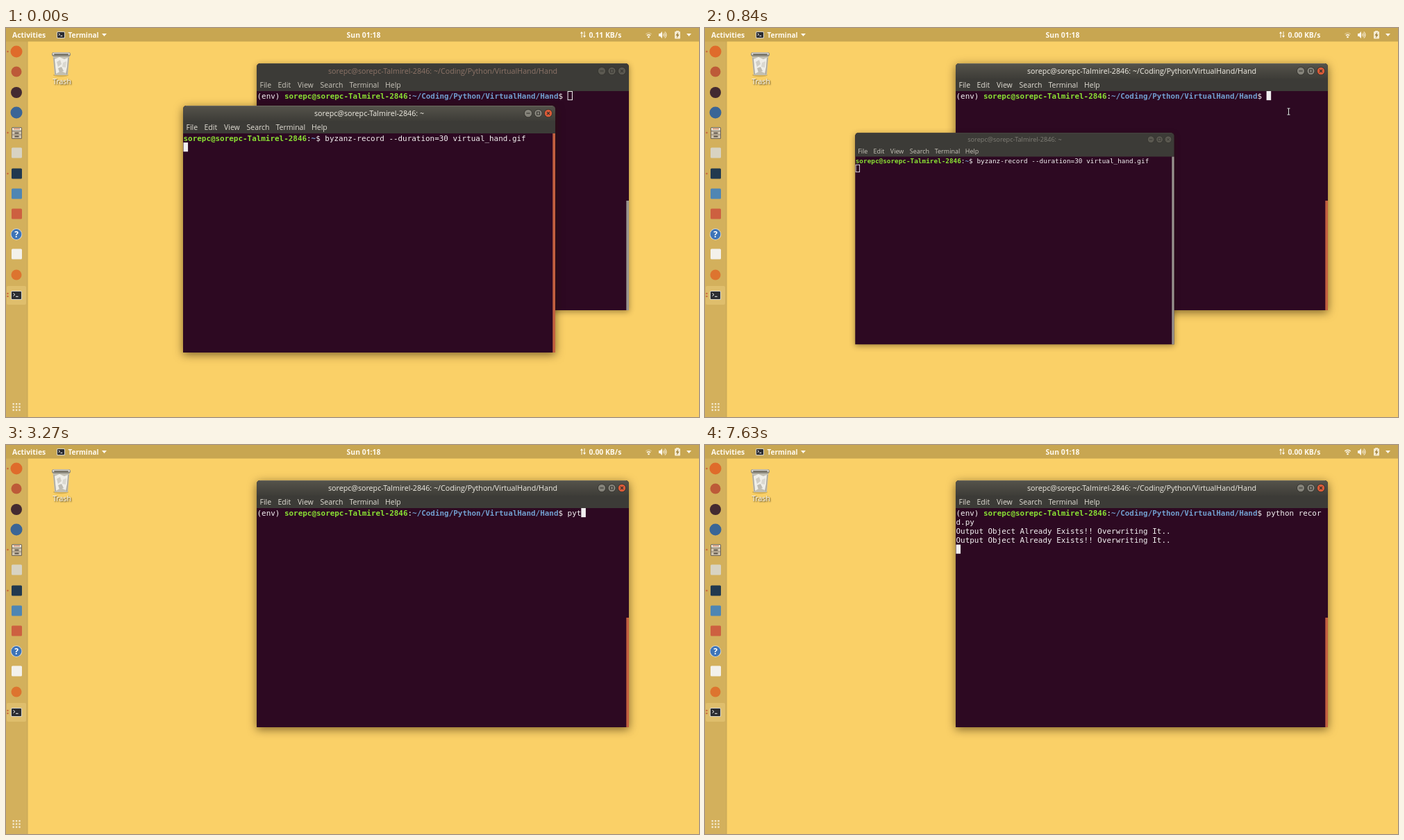
Recreate the animation shown at these times as an HTML page with a canvas. Size 998 by 561 pixels, loop 8000 ms.

```html
<!DOCTYPE html>
<html lang="en">
<head>
<meta charset="utf-8">
<title>Desktop</title>
<style>
html, body { margin: 0; width: 100%; height: 100%; overflow: hidden; background: #fad067; }
canvas { display: block; width: 998px; height: 561px; }
</style>
</head>
<body>
<canvas id="stage" width="998" height="561"></canvas>
<script>
const ctx = document.getElementById('stage').getContext('2d');
const LOOP = 8000;
const UI = '"Open Sans", "Noto Sans", sans-serif';
const MONO = '"DejaVu Sans Mono", "Liberation Mono", monospace';
const CW = 6.575, CH = 13.15, COLS = 80;
const WIN_W = 536, WIN_H = 356;
const USER = 'sorepc@sorepc-Talmirel-2846';
const FOLDER = '~/Coding/Python/VirtualHand/Hand';
const GREEN = '#8ae234', BLUE = '#729fcf', WHITE = '#f3f1f2';
const MENU = [['File', 4.5], ['Edit', 30.5], ['View', 59], ['Search', 91.5], ['Terminal', 133.5], ['Help', 185]];

const SPEED = [[0, '0.11'], [590, '0.00'], [1430, '0.27'], [2470, '0.00'], [3430, '0.12'], [4410, '1.12'], [5510, '0.00']];
const TYPED = [[0, 0], [2520, 1], [2750, 2], [3270, 3], [3370, 4], [3480, 5], [3540, 6], [3920, 7],
  [4280, 8], [4330, 9], [5360, 10], [5430, 11], [5580, 17]];
const BLINK_OFF = [[1240, 1830], [2420, 2520], [4920, 5360], [6130, 6730], [7330, 7510]];
const MOUSE = [[0, null], [740, [773, 125.5]], [790, [816, 121]], [840, [840.5, 120.5]], [890, [842, 124]], [940, [842, 126]], [2570, null]];
const MIN_BUTTON = [[0, '#85837a'], [340, '#a9a79e'], [490, '#bab8b0'], [540, '#cac8c1'], [640, '#dddcd7']];

const at = (keys, t) => keys.reduce((v, [k, next]) => t >= k ? next : v, keys[0][1]);

function rect(x, y, w, h, color) {
  ctx.fillStyle = color;
  ctx.fillRect(x, y, w, h);
}

function rounded(x, y, w, h, r, color) {
  ctx.fillStyle = color;
  ctx.beginPath();
  ctx.roundRect(x, y, w, h, r);
  ctx.fill();
}

function disc(x, y, r, color) {
  ctx.fillStyle = color;
  ctx.beginPath();
  ctx.arc(x, y, r, 0, Math.PI * 2);
  ctx.fill();
}

function poly(points, color) {
  ctx.fillStyle = color;
  ctx.beginPath();
  points.forEach(([x, y]) => ctx.lineTo(x, y));
  ctx.closePath();
  ctx.fill();
}

function line(points, color, width = 1) {
  ctx.strokeStyle = color;
  ctx.lineWidth = width;
  ctx.beginPath();
  points.forEach(([x, y]) => ctx.lineTo(x, y));
  ctx.stroke();
}

function arc(x, y, r, from, to, color, width) {
  ctx.strokeStyle = color;
  ctx.lineWidth = width;
  ctx.beginPath();
  ctx.arc(x, y, r, from, to);
  ctx.stroke();
}

function label(text, x, y, color, font, align = 'left') {
  ctx.font = font;
  ctx.fillStyle = color;
  ctx.textAlign = align;
  ctx.fillText(text, x, y);
}

function vertical(y, h, ...colors) {
  const g = ctx.createLinearGradient(0, y, 0, y + h);
  colors.forEach((c, i) => g.addColorStop(i / (colors.length - 1), c));
  return g;
}

// --- desktop ---

function terminalIcon(x, y, w, h) {
  rounded(x, y, w, h, 1.5, '#d5d2c6');
  rounded(x + 1, y + 1, w - 2, h - 2, 1, '#2b2c31');
  const u = h / 11;
  line([[x + 3 * u, y + 3 * u], [x + 5 * u, y + 4.7 * u], [x + 3 * u, y + 6.4 * u]], '#fff', 1);
  line([[x + 6 * u, y + 7 * u], [x + 9 * u, y + 7 * u]], '#fff', 1);
}

function filesIcon() {
  rounded(8, 143, 15, 17, 1.5, '#6e6353');
  rect(9, 144, 13, 4, '#e8e1d2');
  rect(9, 149, 13, 10, '#cfc4af');
  rect(9, 153.5, 13, 1, '#8d806b');
  rect(11, 145, 9, 1, '#c2613c');
  rect(12.5, 150.5, 6, 2, '#5a5146');
  rect(12.5, 155.5, 6, 2, '#5a5146');
}

function dock() {
  rect(0, 19, 31, 542, '#d3b05c');
  rect(30.5, 19, 1, 542, '#c6a556');
  rounded(1, 372, 28, 27, 2, 'rgba(255,226,150,.28)');

  const circles = [[34, 8.5, '#df6b2b'], [63, 7.5, '#bd5a38'], [93, 8, '#432a31'], [122, 8.5, '#3a6596'], [356, 7.5, '#dd742f']];
  const squares = [[180, '#d8d3c2'], [210, '#21394f'], [239, '#4f86b3'], [268, '#cd6040'], [326, '#f3f1eb']];
  circles.forEach(([y, r, c]) => disc(15, y, r, c));
  squares.forEach(([y, c]) => rounded(8, y - 7.5, 15, 15, 1.5, c));

  filesIcon();
  disc(15, 297.5, 8.2, '#e4e2dc');
  disc(15, 297.5, 7.4, '#3d74b8');
  label('?', 15, 302, '#fff', `bold 12px ${UI}`, 'center');
  terminalIcon(7, 379, 16, 13);

  [34, 151, 210, 383, 387].forEach(y => disc(2.5, y, 1.2, '#c8643a'));
  for (let i = 0; i < 9; i++) rect(9.5 + i % 3 * 4.4, 541 + Math.floor(i / 3) * 4.4, 2.4, 2.4, '#f3e8cc');
}

function trash() {
  ctx.fillStyle = 'rgba(90,70,20,.22)';
  ctx.beginPath();
  ctx.ellipse(79, 68, 11, 2.5, 0, 0, Math.PI * 2);
  ctx.fill();
  poly([[67.5, 39], [91.5, 39], [89, 68], [70, 68]], '#c2bfb2');
  poly([[70, 45], [77, 42], [84, 45], [89, 43], [88, 56], [86, 65], [79, 62], [72, 66]], '#efeee8');
  poly([[73, 49], [78, 46], [80, 52], [75, 56]], '#d0cec5');
  poly([[82, 50], [87, 48], [86, 57], [81, 56]], '#dad8d0');
  poly([[75, 58], [80, 56], [83, 62], [77, 64]], '#bfbcb2');
  line([[69, 43], [71.5, 67]], '#a5a295', 1);
  line([[90, 43], [87.5, 67]], '#a5a295', 1);
  rounded(66, 35, 27, 6, 3, '#8c897e');
  rounded(67, 35.5, 25, 3.6, 2, '#d9d7cf');
  rounded(69, 37, 21, 2, 1, '#77746a');
  ctx.save();
  ctx.shadowColor = 'rgba(0,0,0,.85)';
  ctx.shadowBlur = 2;
  ctx.shadowOffsetX = ctx.shadowOffsetY = 1;
  label('Trash', 80.5, 80.5, '#fff', `10.5px ${UI}`, 'center');
  ctx.restore();
}

function topBar(t) {
  const font = `bold 10.4px ${UI}`, ink = '#fffaf0';
  rect(0, 0, 998, 19.5, '#c8a651');
  label('Activities', 9, 13.5, ink, font);
  terminalIcon(73, 5, 12, 10);
  label('Terminal', 89.5, 13.5, ink, `bold 10px ${UI}`);
  poly([[138, 8], [145, 8], [141.5, 12]], ink);
  label('Sun 01:18', 515, 13.5, ink, font, 'center');

  line([[829, 14], [829, 6]], ink);
  poly([[827, 8], [831, 8], [829, 5]], ink);
  line([[833, 5], [833, 13]], ink);
  poly([[831, 11], [835, 11], [833, 14]], ink);
  label(at(SPEED, t) + ' KB/s', 839.5, 13.5, ink, font);

  const up = -Math.PI / 2, far = t >= 5510 ? ink : 'rgba(255,250,240,.35)';
  disc(925.5, 13, 1.3, ink);
  arc(925.5, 13.5, 3.6, up - .75, up + .75, ink, 1.4);
  arc(925.5, 13.5, 6.2, up - .75, up + .75, far, 1.4);

  poly([[940, 8], [942, 8], [945, 5], [945, 15], [942, 12], [940, 12]], ink);
  [2.5, 4.5, 6.5].forEach(r => arc(944.5, 10, r, -.8, .8, ink, 1));

  rounded(963, 5, 8, 10.5, 1, '#f4ead0');
  rect(965, 4, 4, 1, '#f4ead0');
  poly([[968, 6], [964.5, 10.8], [966.6, 10.8], [966, 14.5], [969.6, 9.4], [967.4, 9.4]], '#9d7d35');
  poly([[980, 8], [987, 8], [983.5, 12]], ink);
}

// --- terminal windows ---

function button(x, y, kind, focused, fill) {
  const close = kind === 'close';
  disc(x, y, 6, focused ? '#33322d' : '#35342f');
  disc(x, y, 5.2, fill || (focused ? (close ? '#dd5b38' : '#85837a') : '#5b5951'));
  const ink = focused || fill ? '#34332e' : '#3a3934';
  if (kind === 'min') line([[x - 2.6, y], [x + 2.6, y]], ink, 1.1);
  if (kind === 'max') {
    ctx.strokeStyle = ink;
    ctx.lineWidth = 1;
    ctx.strokeRect(x - 2, y - 2, 4, 4);
  }
  if (close) {
    line([[x - 2, y - 2], [x + 2, y + 2]], ink, 1.1);
    line([[x - 2, y + 2], [x + 2, y - 2]], ink, 1.1);
  }
}

// Lays runs of [text, color, bold] out on the character grid; returns the cursor cell.
function grid(runs) {
  let col = 0, row = 0;
  for (const [text, color, bold] of runs) {
    ctx.font = `${bold ? 'bold ' : ''}10.92px ${MONO}`;
    ctx.fillStyle = color;
    ctx.textAlign = 'left';
    for (const ch of text) {
      if (ch === '\n') { col = 0; row++; continue; }
      if (col === COLS) { col = 0; row++; }
      ctx.fillText(ch, .5 + col * CW, 40 + row * CH + 10.7);
      col++;
    }
  }
  return [.5 + col * CW, 40 + row * CH];
}

function terminal({ x, y, scale = 1, title, titleColor, focused, runs, cursor = true, bar, minFill }) {
  ctx.save();
  ctx.translate(x, y);
  ctx.scale(scale, scale);

  ctx.save();
  ctx.shadowColor = focused ? 'rgba(40,25,0,.6)' : 'rgba(40,25,0,.45)';
  ctx.shadowBlur = focused ? 13 : 9;
  ctx.shadowOffsetY = focused ? 3 : 2;
  rounded(0, 0, WIN_W, WIN_H, [5, 5, 0, 0], '#2d0922');
  ctx.restore();

  rounded(0, 0, WIN_W, 40, [5, 5, 0, 0], '#3c3b37');
  if (focused) rounded(0, 0, WIN_W, 22, [5, 5, 0, 0], vertical(0, 22, '#55534b', '#3e3d38'));
  line([[4, .5], [WIN_W - 4, .5]], focused ? '#6a685f' : '#4a4943');
  label(title, 268, 14.6, focused ? '#f2efe6' : titleColor, `500 10.7px ${UI}`, 'center');
  button(497, 11, 'min', focused, minFill);
  button(511.5, 11, 'max', focused);
  button(526, 11, 'close', focused);
  MENU.forEach(([text, mx]) => label(text, mx, 35.2, focused ? '#e2ded5' : '#c9c5bb', `10.5px ${UI}`));

  rect(WIN_W - 3.7, bar, 3.7, WIN_H - bar, focused ? '#c2603f' : '#99958f');
  const [cx, cy] = grid(runs);
  if (focused && cursor) rect(cx, cy, CW, CH, '#f1eff0');
  if (!focused) {
    ctx.strokeStyle = '#f1eff0';
    ctx.lineWidth = 1;
    ctx.strokeRect(cx + .5, cy + .5, CW - .2, CH - 1);
  }
  ctx.restore();
}

function backWindow(t) {
  const runs = [['(env) ', WHITE], [USER, GREEN, true], [':', WHITE], [FOLDER, BLUE, true],
    ['$ ' + 'python record.py '.slice(0, at(TYPED, t)), WHITE]];
  if (t >= 7510) runs.push(['\n', WHITE]);
  [7570, 7630].forEach(k => {
    if (t >= k) runs.push(['Output Object Already Exists!! Overwriting It..\n', WHITE]);
  });
  terminal({
    x: 361, y: 51, title: `${USER}: ${FOLDER}`, titleColor: '#8d7468', focused: t >= 690, runs, bar: 198,
    cursor: !BLINK_OFF.some(([a, b]) => t >= a && t < b)
  });
}

function frontWindow(t) {
  if (t >= 940) return;
  // Minimizes toward the dock with an exponential ease-in, sampled every 50 ms.
  const step = Math.floor((t - 490) / 50) * 50 + 490;
  const k = (step - 694.4) / 200;
  const p = k > 0 ? 2 ** (10 * (k - 1)) : 0;
  terminal({
    x: 255 * (1 - p), y: 112 + 259 * p, scale: 1 - .943 * p,
    title: `${USER}: ~`, titleColor: '#817f77', focused: t < 690, bar: 40,
    minFill: t < 790 ? at(MIN_BUTTON, t) : '',
    runs: [[USER, GREEN, true], [':', WHITE], ['~', BLUE, true],
      ['$ byzanz-record --duration=30 virtual_hand.gif\n', WHITE]]
  });
}

function mouse(t) {
  const pos = at(MOUSE, t);
  if (!pos) return;
  const [x, y] = pos;
  [['rgba(20,10,20,.6)', 2.4], ['#e4e2e3', 1]].forEach(([c, w]) => {
    line([[x - 2, y - 4.5], [x + 2, y - 4.5]], c, w);
    line([[x, y - 4.5], [x, y + 4.5]], c, w);
    line([[x - 2, y + 4.5], [x + 2, y + 4.5]], c, w);
  });
}

function draw(t) {
  rect(0, 0, 998, 561, '#fad067');
  trash();
  backWindow(t);
  frontWindow(t);
  dock();
  topBar(t);
  mouse(t);
}

const start = performance.now();
function tick() {
  draw((performance.now() - start) % LOOP);
  requestAnimationFrame(tick);
}
tick();
</script>
</body>
</html>
```
